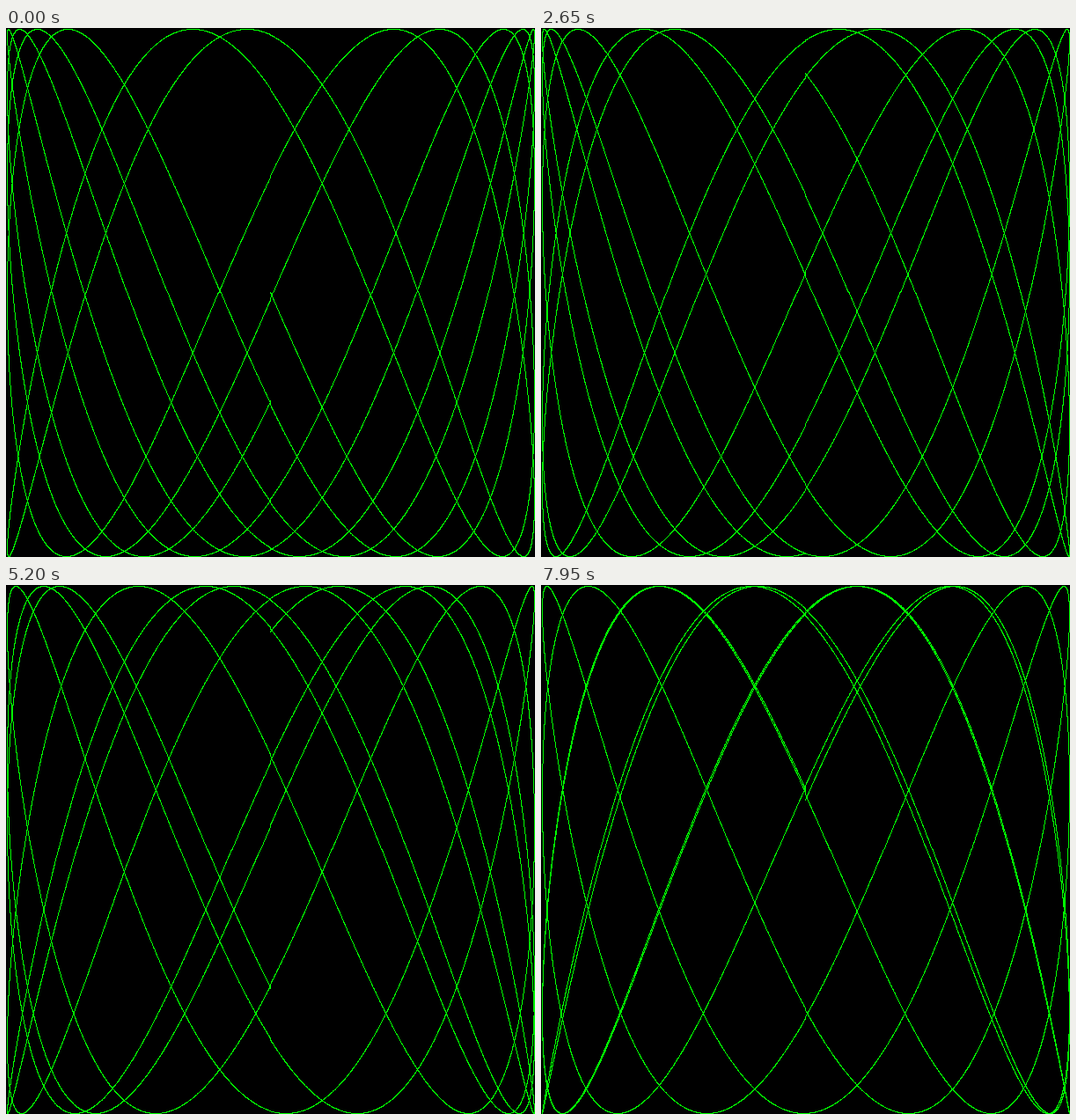
Recreate the animation shown at these times as an HTML page with a canvas. Size 601 by 601 pixels, loop 8000 ms.

```html
<!DOCTYPE html>
<html lang="en">
<head>
<meta charset="utf-8">
<title>Lissajous figure</title>
<style>
  html, body { margin: 0; width: 100%; height: 100%; overflow: hidden; background: #000; }
  canvas { display: block; width: 100vw; height: 100vh; image-rendering: pixelated; }
</style>
</head>
<body>
<canvas id="stage" width="601" height="601"></canvas>
<script>
const RADIUS = 300;
const SIZE = 2 * RADIUS + 1;
const CYCLES = 5;
const STEP = 0.001;
const FREQUENCY = 2.28667;
const PHASE_STEP = 0.1;
const FRAME_MS = 50;
const FRAMES = 160;

const BLACK = 0xff000000;
const GREEN = 0xff00ff00;

const ctx = document.getElementById('stage').getContext('2d');
const image = ctx.createImageData(SIZE, SIZE);
const pixels = new Uint32Array(image.data.buffer);

// Truncating toward zero gives the small seams along the centre lines.
const toPixel = v => RADIUS + Math.trunc(v * RADIUS + 0.5);

function draw(frame) {
  const phase = frame * PHASE_STEP;
  pixels.fill(BLACK);
  for (let t = 0; t < CYCLES * 2 * Math.PI; t += STEP) {
    const x = toPixel(Math.sin(t));
    const y = toPixel(Math.sin(t * FREQUENCY + phase));
    pixels[y * SIZE + x] = GREEN;
  }
  ctx.putImageData(image, 0, 0);
}

const start = performance.now();
let shown = -1;

function tick() {
  const frame = Math.floor((performance.now() - start) / FRAME_MS) % FRAMES;
  if (frame !== shown) draw(shown = frame);
  requestAnimationFrame(tick);
}
tick();
</script>
</body>
</html>
```
